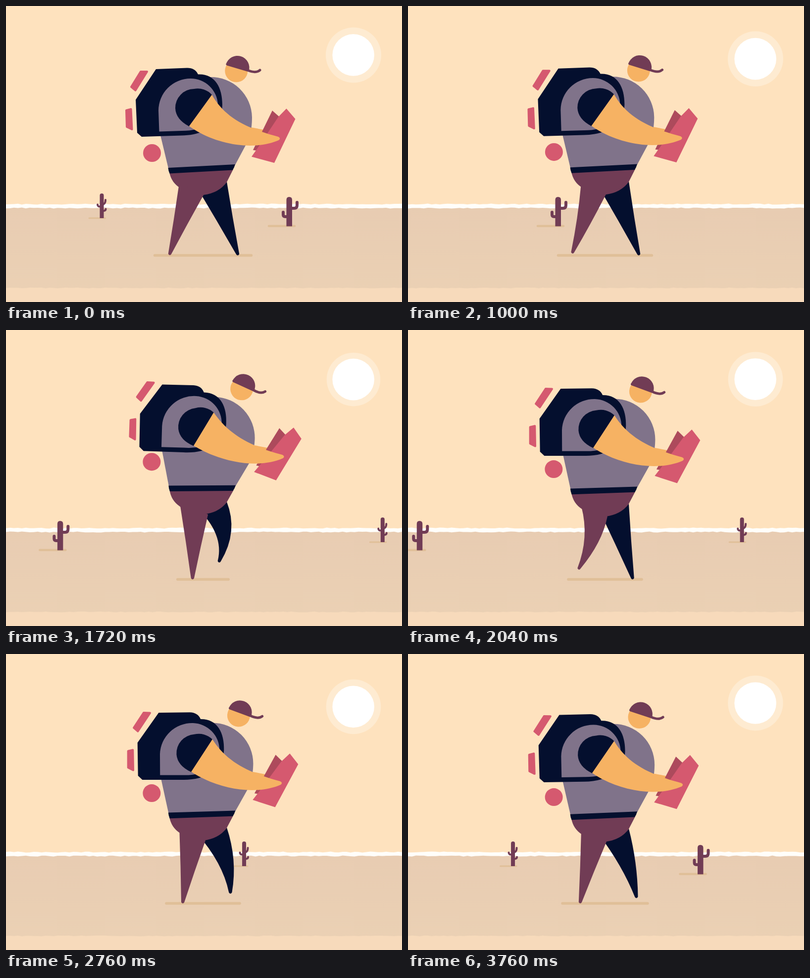
Write an HTML page that moves like this. It is 800 px wide and 600 px high and loops after 3800 ms.

```html
<!DOCTYPE html>
<html lang="en">
<head>
<meta charset="utf-8">
<title>Desert walk</title>
<style>
  html, body { margin: 0; width: 100%; height: 100%; overflow: hidden; background: #fee2be; }
  svg { display: block; width: 800px; height: 600px; }
  .navy { fill: #040f2e; }
  .vest { fill: #80738a; }
  .plum { fill: #713c55; }
  .skin { fill: #f6b263; }
  .rose { fill: #d5596f; }
  .line { fill: none; stroke: #713c55; stroke-linecap: round; stroke-linejoin: round; }
  .shade { fill: none; stroke: #e0bf98; stroke-linecap: round; }
</style>
</head>
<body>
<svg viewBox="0 0 800 600">
  <defs>
    <linearGradient id="sand" x1="0" y1="0" x2="0" y2="1">
      <stop offset="0" stop-color="#e8ccb2"/>
      <stop offset="1" stop-color="#ebd1b4"/>
    </linearGradient>
  </defs>
  <rect width="800" height="600" fill="#fee2be"/>
  <circle id="halo" cx="702" fill="#feebd1"/>
  <circle id="sun" cx="701.7" r="42.3" fill="#fff"/>
  <path d="M0 406H800V600H0Z" fill="url(#sand)"/>
  <path id="front" fill="#f7dabb"/>
  <path id="horizon" fill="#fffefa"/>

  <g id="small">
    <path class="shade" d="M-25.5 430H7" stroke-width="3"/>
    <path class="plum" d="M-4 430V384Q-4 380 0 380Q4 380 4 384V430Z"/>
    <path class="line" d="M3 402Q7.5 400 7.5 393M-3 406.5Q-8.5 407 -8.5 402.5M3 415.5Q8 415 8 411.5" stroke-width="4"/>
  </g>
  <g id="big">
    <path class="shade" d="M-41 446H11" stroke-width="4.5"/>
    <path class="plum" d="M-5.5 446.5V393Q-5.5 387 0 387Q6 387 6 393V446.5Z"/>
    <path class="line" d="M4 410H10Q16 410 16 404V398M-4 427H-8Q-12 427 -12 423V418" stroke-width="6"/>
  </g>

  <path id="shadow" class="shade" stroke-width="5.5"/>
  <path id="farLeg" class="navy" stroke="#040f2e" stroke-width="3" stroke-linejoin="round"/>
  <path id="farHand" class="skin" d="M480 244L498 246.500L526 252L518 264L485 266Z"/>
  <g id="book">
    <path d="M538 212L556 228L515 294L499 292Z" fill="#ad4a5c"/>
    <path class="rose" d="M566.5 208L584.5 229L542 318L496 305.5L511 284L550 225Z"/>
  </g>
  <g id="torso">
    <path class="vest" d="M311 258L328 329L463 322L488 275Q497 255 497 226A83 83 0 0 0 412 144L340 160Z"/>
    <path class="plum" d="M330 337Q334 358 352 369Q372 384 399 383Q430 379 446 357L459 331Z"/>
    <path class="navy" d="M327.5 328L463 321Q461 328 458 332.5L330.5 339.5Q328 334 327.5 328Z"/>
  </g>
  <path id="nearLeg" class="plum" stroke="#713c55" stroke-width="3" stroke-linejoin="round"/>
  <g id="pack">
    <path class="navy" d="M303 128L366 125.5Q382 125.5 388 138.5C422 137 437 165 437 200C437 240 400 262 355 262.5L274 265L265 257L262 190Z"/>
    <path class="vest" d="M309.5 254.5L308 212A65 65 0 0 1 373 147A55 55 0 0 1 428 200C428 235 400 253 355 253Z"/>
  </g>
  <g id="pockets" class="rose" stroke="#d5596f" stroke-width="4" stroke-linejoin="round">
    <path d="M272 133L285 133L261.5 171L253 164Z"/>
    <path d="M243 211.5L252.5 209L254.5 250L244 245Z"/>
  </g>
  <circle id="roll" class="rose" cx="295" cy="298" r="18"/>
  <path id="sleeve" class="navy" d="M416 180A38.5 38.5 0 0 0 380 168A38.5 38.5 0 0 0 342 207Q343 230 370 244Z"/>
  <path id="arm" class="skin"/>
  <g id="head">
    <circle class="skin" cx="465.3" cy="131.5" r="23"/>
    <path class="plum" d="M444.5 118A24 24 0 0 1 490.5 132Z"/>
    <path class="line" d="M447 118L489 130.5Q505 137 513 130" stroke-width="5"/>
  </g>
</svg>
<script>
const LOOP = 3800, STEP = 40, CYCLE = 24, TAU = Math.PI * 2;
const $ = id => document.getElementById(id);
const set = (id, attrs) => { for (const k in attrs) $(id).setAttribute(k, attrs[k]); };

// Per part: pivot, then [dx, dy, degrees] gained by leaning and by rising
const hold = { pivot: [553, 270], lean: [5, 6, 4], rise: [5, -17.5, 3] };
const parts = {
  torso: { pivot: [395.5, 324.5], lean: [1.4, 0, 2.4], rise: [0, -10, 1] },
  pack: { pivot: [303, 128], lean: [12.4, -3.5, 2.7], rise: [3.7, -16, 1.8] },
  pockets: { pivot: [303, 128], lean: [12.4, -3.5, 2.7], rise: [5, -24, 1.8] },
  roll: { pivot: [295, 298], lean: [2.9, -5, 0], rise: [-3, -29, 0] },
  sleeve: { pivot: [380, 206], lean: [8, -0.6, 3], rise: [0, -10, -7.5] },
  head: { pivot: [465, 131], lean: [11.3, 4.2, 6], rise: [2.8, -16.4, 4] },
  book: hold
};

const shift = ({ lean, rise }, pose) => lean.map((v, i) => v * pose.lean + rise[i] * pose.rise);

function transform(part, pose) {
  const [dx, dy, turn] = shift(part, pose);
  return `translate(${dx} ${dy}) rotate(${turn} ${part.pivot})`;
}

// Shoulder points turn with the sleeve, hand points slide with the book
function armPath(pose) {
  const [dx, dy, turn] = shift(parts.sleeve, pose);
  const [hx, hy] = shift(hold, pose);
  const [cx, cy] = parts.sleeve.pivot;
  const cos = Math.cos(turn * TAU / 360), sin = Math.sin(turn * TAU / 360);
  const up = (x, y) => [
    cx + dx + (x - cx) * cos - (y - cy) * sin,
    cy + dy + (x - cx) * sin + (y - cy) * cos
  ];
  const hand = (x, y) => [x + hx, y + hy];
  return `M${up(416, 180)}C${up(440, 222)} ${hand(478, 246)} ${hand(550, 265)}` +
    `Q${hand(556, 268)} ${hand(551, 272)}C${hand(498, 295)} ${up(420, 280)} ${up(370, 243.5)}Z`;
}

// Swing forward with a lifted, bent leg, then slide back with the ground
function foot(step) {
  const s = step % CYCLE / (CYCLE / 2);
  if (s < 1) {
    const lift = 36 * Math.sin(Math.PI * s) ** 1.8;
    return [381 - 50 * Math.cos(Math.PI * s), 502 - lift, lift];
  }
  const u = s - 1;
  return [431 - 100 * (u - u * (1 - u) ** 3), 502.5, 0];
}

function leg(a, b, [x, y, bend]) {
  const ctrl = (p, k) => [(p[0] + x) / 2 + bend * k, (p[1] + y) / 2];
  return `M${a}Q${ctrl(a, 1)} ${x - 1.7},${y}Q${x},${y + 3} ${x + 1.7},${y}Q${ctrl(b, 0.9)} ${b}Z`;
}

function noise(n) {
  const v = Math.sin(n * 127.1 + 11.7) * 43758.5453;
  return v - Math.floor(v) - 0.5;
}
function edge(y, amp, seed, back) {
  const pts = [];
  for (let x = 0; x <= 800; x += 8) pts.push(`${x},${(y + amp * noise(x / 8 + seed)).toFixed(2)}`);
  return (back ? pts.reverse() : pts).join("L");
}

// Ground objects drift left and come back on the right
function drift(x, n) {
  const span = 1030, moved = x + 100 - 10.76 * n;
  return `translate(${(moved % span + span) % span - 100})`;
}

function draw(time) {
  const n = Math.floor(time % LOOP / STEP), step = n % CYCLE;
  const w = TAU * step / CYCLE;
  const pose = { lean: 1 - Math.cos(w), rise: (1 - Math.cos(2 * w)) / 2 };

  const cy = 103.3 - 3.9 * Math.cos(TAU * n / 48);
  set("sun", { cy });
  set("halo", { cy, r: 53.6 + 2.4 * Math.cos(w) });

  const seed = Math.floor(n / 3) * 131;
  set("horizon", { d: `M${edge(401.5, 2, seed)}L${edge(409.5, 2, seed + 400, true)}Z` });
  set("front", { d: `M${edge(571.5, 1.6, seed + 800)}L800,600L0,600Z` });
  set("big", { transform: drift(572, n) });
  set("small", { transform: drift(193.5, n) });

  const half = 97.5 - 12.7 * pose.lean - 39.5 * pose.rise;
  set("shadow", { d: `M${398 - half} 505.5H${398 + half}` });

  for (const id in parts) set(id, { transform: transform(parts[id], pose) });
  const [hx, hy] = shift(hold, pose);
  set("farHand", { transform: `translate(${hx} ${hy})` });
  set("arm", { d: armPath(pose) });

  const hip = (x, y, dx = 0) => [x + dx * pose.lean, y - 8 * pose.rise];
  const [fx, fy, bend] = foot(step + CYCLE / 2);
  set("nearLeg", { d: leg(hip(351, 362, 3), hip(398, 382, 11.5), foot(step)) });
  set("farLeg", { d: leg(hip(387, 367), hip(444.5, 356), [fx + 37, fy, bend]) });
}

const start = performance.now();
function tick() {
  draw(performance.now() - start);
  requestAnimationFrame(tick);
}
tick();
</script>
</body>
</html>
```
